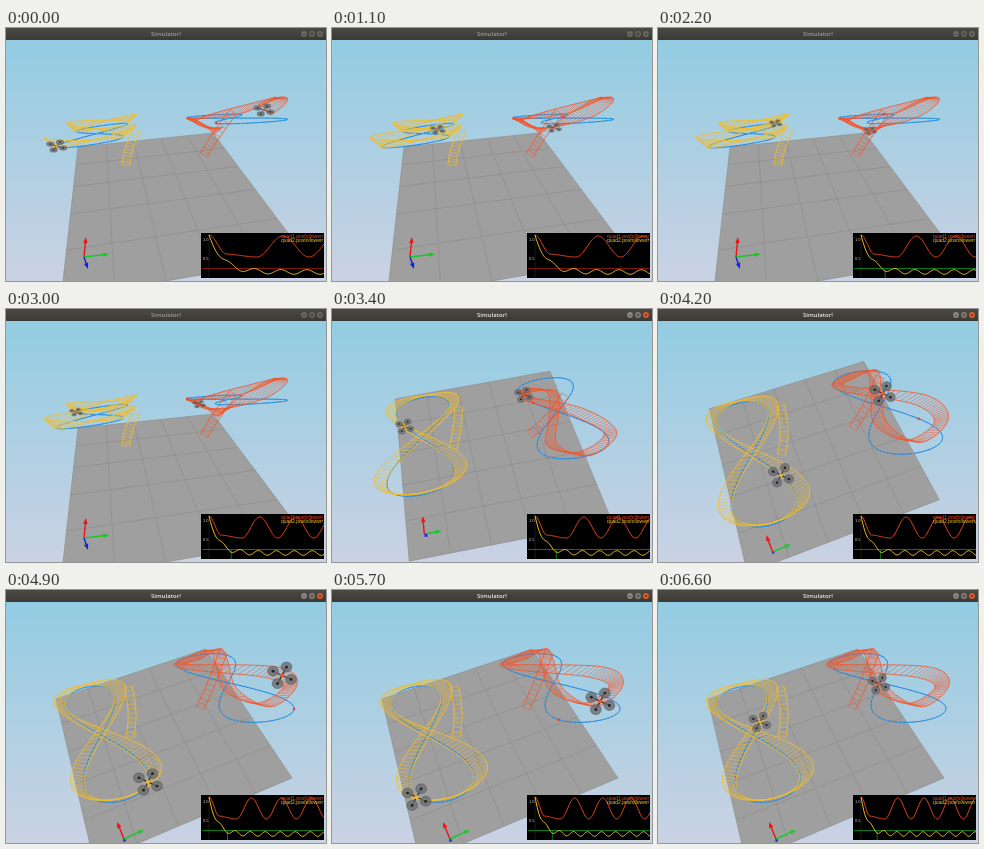
Recreate the animation shown at these times as an HTML page. Size 320 px wide and 253 px high, loop 6.7 s.

```html
<!DOCTYPE html>
<html lang="en">
<head>
<meta charset="utf-8">
<title>Simulator</title>
<style>
  html, body { margin: 0; width: 100%; height: 100%; overflow: hidden; background: #a8cfe3; }
  svg { display: block; width: 100vw; height: 100vh; }
  path, line { fill: none; }
  .title { font: 600 6px "Open Sans", "Noto Sans", sans-serif; text-anchor: middle; }
  .plot text { font: 5px "Liberation Sans", Arial, sans-serif; }
  .plot .scale { font-size: 4px; }
</style>
</head>
<body>
<svg viewBox="0 0 320 253" preserveAspectRatio="none">
  <defs>
    <linearGradient id="sky" x1="0" y1="0" x2="0" y2="1">
      <stop offset="0" stop-color="#90cce2"/><stop offset="1" stop-color="#cad2e3"/>
    </linearGradient>
    <linearGradient id="bar" x1="0" y1="0" x2="0" y2="1">
      <stop offset="0" stop-color="#4b4a43"/><stop offset="1" stop-color="#3a3933"/>
    </linearGradient>
    <clipPath id="plotClip"><rect x="196" y="206" width="122" height="44"/></clipPath>
  </defs>
  <rect width="320" height="253" fill="url(#sky)"/>
  <g id="scene"></g>
  <rect width="320" height="12" fill="url(#bar)"/>
  <text id="title" class="title" x="160" y="8.2">Simulator!</text>
  <g id="buttons"></g>
  <g class="plot">
    <rect x="195" y="205" width="123" height="45" fill="#000"/>
    <path d="M203 206V250" stroke="#444" stroke-width=".4"/>
    <path id="limit" stroke-width=".8"/>
    <g clip-path="url(#plotClip)" stroke-width="1">
      <path id="err1" stroke="#e8441c"/>
      <path id="err2" stroke="#f0c020"/>
    </g>
    <text class="scale" x="197" y="212.500" fill="#ccc">1.0</text>
    <text class="scale" x="197" y="231.500" fill="#ccc">0.5</text>
    <text x="275" y="210" fill="#f0431f">quad1.posfollowerr</text>
    <text x="275" y="214" fill="#f2c52a">quad2.posfollowerr</text>
  </g>
</svg>
<script>
const LOOP = 6700, RAD = Math.PI / 180;
const NS = "http://www.w3.org/2000/svg";
const byId = id => document.getElementById(id);

// Each view: floor corners (near left, near right, far right, far left), axes,
// half wing span on screen and its tilt when banking, and per drone
// an eight (centre, long axis, side axis, depth factor) with its trail.
const views = [
  {
    floor: [[55, 271], [300, 229], [207, 105], [72, 119]],
    axes: [[78, 229], [80, 209], [103, 226], [82, 241]],
    size: 0.64, squash: 0.6, wing: [5, 0], bank: 4.5,
    yellow: { c: [90.7, 105.6], a: [24.6, 9.3], b: [29, -4], w: 0.18, lift: -5,
      climb: [[120, 137], [121, 121], [131, 102]] },
    red: { c: [224, 90.2], a: [14.6, 12.8], b: [30, -2], w: 0.18,
      climb: [[198, 127], [206, 112], [227, 84]],
      path: [[227, 97], [216, 103], [206, 100], [193, 95], [188, 91], [238, 81], [275, 70], [258, 82]] }
  },
  {
    floor: [[94, 238], [265, 200], [226, 30], [57, 68]],
    axes: [[103, 222], [99, 206], [115, 219], [106, 218]],
    size: 0.9, squash: 1, wing: [5.5, -1.2], bank: 0.5,
    yellow: { c: [89, 147], a: [10.6, -51.9], b: [30, -6], w: 0.16, lift: 0,
      climb: [[122, 141], [129, 120], [124, 95]] },
    red: { c: [226, 112], a: [22, -46], b: [31, -8], w: 0.16,
      climb: [[197, 124], [222, 115], [238, 88]],
      path: [[215, 165], [226, 112], [230, 70], [196, 72], [205, 89], [253, 120], [281, 165], [248, 192]] }
  },
  {
    floor: [[88, 272], [286, 188], [200, 59], [50, 109]],
    axes: [[118, 249], [111, 232], [138, 240], [119, 252]],
    size: 0.88, squash: 0.92, wing: [6, -1.5], bank: 3,
    yellow: { c: [95, 145], a: [-3, -32], b: [28, -7], w: 0.16, lift: -3,
      climb: [[124, 147], [129, 120], [122, 97]] },
    red: { c: [222, 92.7], a: [0, -17.3], b: [30, -5], w: 0.16,
      climb: [[194, 118], [206, 95], [217, 62]],
      path: [[225, 100], [216, 74], [209, 60], [190, 67], [178, 76], [264, 82], [284, 96], [258, 115]] }
  }
];

// Time (ms) against angle along the eight (degrees).
const phaseKeys = [[0, -45], [1100, 14], [2200, 62], [3000, 135], [3700, 180], [4900, 238], [6700, 379]];

function mix(p, q, k) {
  if (typeof p === "number") return p + (q - p) * k;
  if (Array.isArray(p)) return p.map((v, i) => mix(v, q[i], k));
  return Object.fromEntries(Object.keys(p).map(key => [key, mix(p[key], q[key], k)]));
}

function ease(t, from, to) {
  const k = Math.min(1, Math.max(0, (t - from) / (to - from)));
  return k * k * (3 - 2 * k);
}

function phaseAt(t) {
  let i = 0;
  while (i < phaseKeys.length - 2 && t > phaseKeys[i + 1][0]) i++;
  const [t0, p0] = phaseKeys[i], [t1, p1] = phaseKeys[i + 1];
  return p0 + (p1 - p0) * (t - t0) / (t1 - t0);
}

function viewAt(t) {
  return t < 3700
    ? mix(views[0], views[1], ease(t, 3100, 3650))
    : mix(views[1], views[2], ease(t, 3750, 4400));
}

function eight(e, deg, spread = 1) {
  const s = Math.sin(deg * RAD), s2 = Math.sin(2 * deg * RAD) * spread;
  return [0, 1].map(i => (e.c[i] + e.a[i] * s + e.b[i] * s2) / (1 + e.w * s));
}

function closedSpline(pts, deg) {
  const u = ((deg / 45) % 8 + 8) % 8, i = Math.floor(u), k = u - i;
  const [p, q, r, s] = [7, 0, 1, 2].map(n => pts[(i + n) % 8]);
  return [0, 1].map(n => q[n] + 0.5 * k * (r[n] - p[n] +
    k * (2 * p[n] - 5 * q[n] + 4 * r[n] - s[n] + k * (3 * (q[n] - r[n]) + s[n] - p[n]))));
}

// Perspective map from the unit square to four corners.
function project([p, q, r, s]) {
  const d1 = [q[0] - r[0], q[1] - r[1]], d2 = [s[0] - r[0], s[1] - r[1]];
  const d = [p[0] - q[0] + r[0] - s[0], p[1] - q[1] + r[1] - s[1]];
  const det = d1[0] * d2[1] - d2[0] * d1[1];
  const g = (d[0] * d2[1] - d2[0] * d[1]) / det, h = (d1[0] * d[1] - d[0] * d1[1]) / det;
  return (u, v) => [0, 1].map(i =>
    (p[i] + u * (q[i] - p[i] + g * q[i]) + v * (s[i] - p[i] + h * s[i])) / (1 + g * u + h * v));
}

const pt = p => p[0].toFixed(2) + " " + p[1].toFixed(2);
const poly = pts => "M" + pts.map(pt).join("L");
const rungs = (a, b) => a.map((p, i) => "M" + pt(p) + "L" + pt(b[i])).join("");
const range = (n, fn) => Array.from({ length: n }, (_, i) => fn(i));

function make(tag, attrs, parent) {
  const el = document.createElementNS(NS, tag);
  for (const k in attrs) el.setAttribute(k, attrs[k]);
  return parent.appendChild(el);
}

const scene = byId("scene");
const stroke = (color, width, extra) => make("path", { stroke: color, "stroke-width": width, ...extra }, scene);

const floor = make("path", { style: "fill:#a09f9f", stroke: "#8a8a8a", "stroke-width": 0.6 }, scene);
const grid = stroke("#8a8a8a", 0.6);
const axes = ["#f01010", "#18c828", "#1020e0"].map(color => ({
  shaft: stroke(color, 1.4),
  head: make("polygon", { fill: color }, scene)
}));

function makeCraft(color) {
  const craft = {
    refLine: stroke("#1f78dc", 1),
    refDots: stroke("#3cc4ea", 1, { "stroke-dasharray": "1.2 2.6" }),
    rails: stroke(color, 0.8),
    rungs: stroke(color, 0.6, { opacity: 0.85 }),
    goal: make("circle", { r: 1.2, fill: "#f03a1a" }, scene),
    body: make("g", {}, scene)
  };
  make("path", { d: "M-8 -4L8 4M4 -8L-4 8", stroke: "#2c2d30", "stroke-width": 1.2 }, craft.body);
  for (const [x, y] of [[-8, -4], [4, -8], [8, 4], [-4, 8]]) {
    make("circle", { cx: x, cy: y, r: 4.8, fill: "#6c6d70", "fill-opacity": 0.8, stroke: "#57595c", "stroke-width": 0.5 }, craft.body);
    make("circle", { cx: x, cy: y, r: 1.3, fill: "#222327" }, craft.body);
  }
  make("circle", { r: 1.8, fill: color }, craft.body);
  return craft;
}
const yellow = makeCraft("#f3bd2b"), red = makeCraft("#f4552b");

const buttons = [298, 306, 314].map(x => make("circle", { cx: x, cy: 6, r: 2.9 }, byId("buttons")));
make("path", { d: "M296.800 6.500h2.400M304.900 4.900h2.200v2.200h-2.200zM312.900 4.900l2.200 2.200m0-2.200l-2.200 2.200",
  stroke: "#2f2e2a", "stroke-width": 0.6 }, byId("buttons"));

function drawFloor(view) {
  const at = project(view.floor);
  floor.setAttribute("d", poly(view.floor) + "Z");
  grid.setAttribute("d", [0.2, 0.4, 0.6, 0.8].map(k =>
    poly([at(k, 0), at(k, 1)]) + poly([at(0, k), at(1, k)])).join(""));
}

function drawAxes([origin, ...tips]) {
  axes.forEach(({ shaft, head }, i) => {
    const tip = tips[i], dx = tip[0] - origin[0], dy = tip[1] - origin[1];
    const len = Math.hypot(dx, dy) || 1, ux = dx / len, uy = dy / len, h = Math.min(6, len * 0.6);
    const base = [tip[0] - ux * h, tip[1] - uy * h];
    shaft.setAttribute("d", poly([origin, base]));
    head.setAttribute("points", [tip, [base[0] - uy * 2.2, base[1] + ux * 2.2],
      [base[0] + uy * 2.2, base[1] - ux * 2.2]].map(pt).join(" "));
  });
}

function climbRails([p, q, r]) {
  const left = [], right = [];
  for (let i = 0; i <= 11; i++) {
    const k = i / 11, m = 1 - k;
    const [x, y] = [0, 1].map(n => m * m * p[n] + 2 * m * k * q[n] + k * k * r[n]);
    const [dx, dy] = [0, 1].map(n => m * (q[n] - p[n]) + k * (r[n] - q[n]));
    const s = 4 / Math.hypot(dx, dy);
    left.push([x - dy * s, y + dx * s]);
    right.push([x + dy * s, y - dx * s]);
  }
  return [left, right];
}

// A wing tip beside the flown path; side is -1 or 1.
function wingTip(view, e, path, side) {
  return deg => {
    const [x, y] = path(deg), k = side / (1 + e.w * Math.sin(deg * RAD));
    const tilt = view.bank * Math.sin(2 * deg * RAD);
    return [x + view.wing[0] * k, y + (view.wing[1] - tilt) * k];
  };
}

function drawCraft(craft, e, view, phase, start, path, position) {
  const ref = poly(range(121, i => eight(e, i * 3)));
  craft.refLine.setAttribute("d", ref);
  craft.refDots.setAttribute("d", ref);

  const from = Math.max(start, phase - 360), count = Math.floor((phase - from) / 3) + 1;
  const angles = range(count, i => from + i * 3);
  const [a, b] = [-1, 1].map(side => angles.map(wingTip(view, e, path, side)));
  const [l, r] = climbRails(e.climb);
  craft.rails.setAttribute("d", [a, b, l, r].map(poly).join(""));
  craft.rungs.setAttribute("d", rungs(a, b) + rungs(l, r));

  const goal = eight(e, phase);
  craft.goal.setAttribute("cx", goal[0]);
  craft.goal.setAttribute("cy", goal[1]);
  const size = view.size / (1 + 1.6 * e.w * Math.sin(phase * RAD));
  craft.body.setAttribute("transform",
    `translate(${pt(position)}) scale(${size.toFixed(3)} ${(size * view.squash).toFixed(3)})`);
}

function redError(s) {
  if (s < 2.74) return 207 + 19 * ease(s, 0, 1) + 3 * ease(s, 0.9, 2.74);
  return 218.500 - 10.500 * Math.cos(2 * Math.PI * (s - 4.24) / 3);
}

function yellowError(s) {
  return 244 - 37 * Math.exp(-s / 0.75) + 2.3 * Math.sin(2 * Math.PI * s / 1.5) * Math.min(1, s);
}

function drawPlot(t) {
  const span = 6.6 + t / 1000, curve = fn => poly(range(161, i => {
    const k = i / 160;
    return [203 + 115 * k, fn(span * k)];
  }));
  byId("err1").setAttribute("d", curve(redError));
  byId("err2").setAttribute("d", curve(yellowError));
  const settled = t >= 1500, x = (203 + 115 * 1.85 / span).toFixed(2);
  byId("limit").setAttribute("d", "M196 240.500H318" + (settled ? `M${x} 240.500V250` : ""));
  byId("limit").setAttribute("stroke", settled ? "#0a9a1e" : "#9c1c10");
}

function drawTitle(active) {
  byId("title").setAttribute("fill", active ? "#efeeea" : "#a09d95");
  buttons.forEach((b, i) => b.setAttribute("fill", active ? (i === 2 ? "#e8582a" : "#8b8980") : "#6b6961"));
}

function render(t) {
  const view = viewAt(t), phase = phaseAt(t), y = view.yellow, r = view.red;
  drawFloor(view);
  drawAxes(view.axes);

  const swing = deg => {
    const [px, py] = eight(y, deg, 1.2);
    return [px, py + y.lift];
  };
  drawCraft(yellow, y, view, phase, -325, swing, eight(y, phase));

  const flown = deg => closedSpline(r.path, deg);
  drawCraft(red, r, view, phase, -300, flown, flown(phase));

  drawPlot(t);
  drawTitle(t >= 3300);
}

const begin = performance.now();
function tick() {
  render((performance.now() - begin) % LOOP);
  requestAnimationFrame(tick);
}
tick();
</script>
</body>
</html>
```
